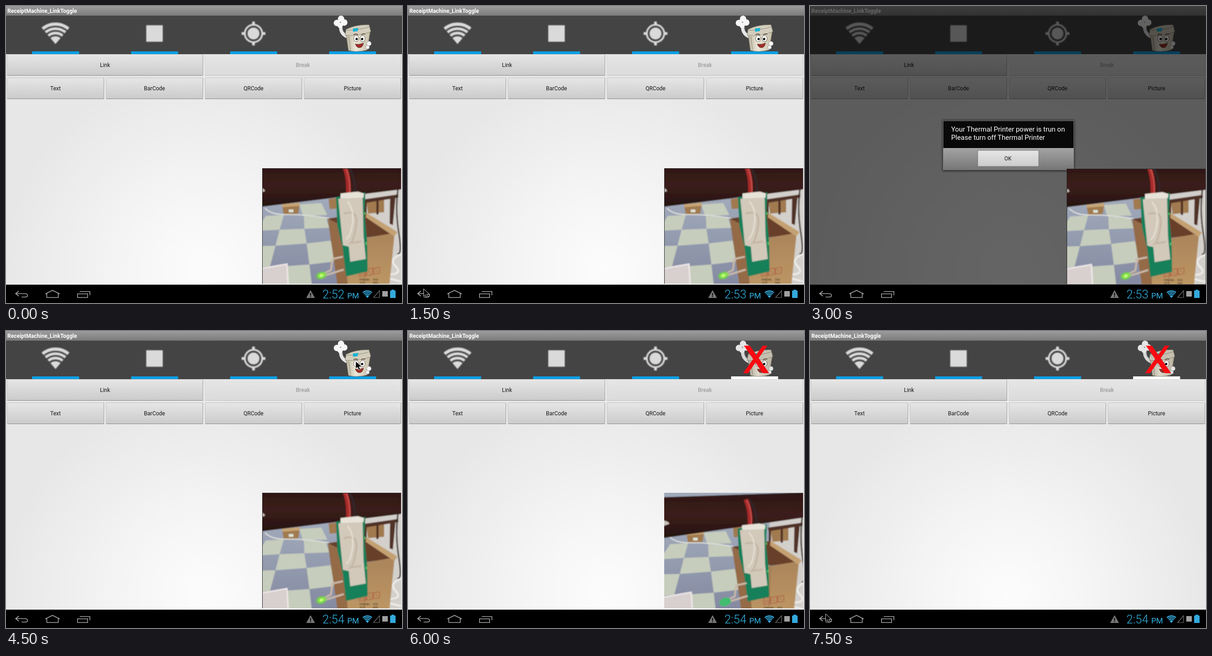
Recreate the animation shown at these times as an HTML page. Size 864x648 px, loop 9000 ms.

```html
<!DOCTYPE html>
<html lang="en">
<head>
<meta charset="utf-8">
<title>Printer switch</title>
<style>
  html, body { margin: 0; width: 100%; height: 100%; overflow: hidden; background: #000; }
  svg { display: block; width: 100vw; height: 100vh; font-family: Roboto, sans-serif; }
  .button { font-size: 12px; text-anchor: middle; fill: #161616; }
  .tiny { font-size: 5.5px; font-weight: bold; fill: #4b3823; }
  .line { fill: none; }
</style>
</head>
<body>
<svg viewBox="0 0 864 648">
  <defs>
    <linearGradient id="titleFill" x2="0" y2="1"><stop stop-color="#9c9c9c"/><stop offset="1" stop-color="#7b7b7b"/></linearGradient>
    <linearGradient id="buttonFill" x2="0" y2="1"><stop stop-color="#e6e6e6"/><stop offset="1" stop-color="#cbcbcb"/></linearGradient>
    <linearGradient id="footFill" x2="0" y2="1"><stop stop-color="#a3a3a3"/><stop offset="1" stop-color="#777"/></linearGradient>
    <linearGradient id="beamFill" x2="0" y2="1"><stop stop-color="#2d1614"/><stop offset=".5" stop-color="#3c1f1b"/><stop offset="1" stop-color="#24110f"/></linearGradient>
    <linearGradient id="floorFill" x2="0" y2="1"><stop offset=".3" stop-color="#a0a9ba"/><stop offset="1" stop-color="#8389a0"/></linearGradient>
    <linearGradient id="boxFill" x2="0" y2="1"><stop stop-color="#a9835a"/><stop offset="1" stop-color="#bd9765"/></linearGradient>
    <linearGradient id="bodyFill"><stop stop-color="#b9b3a1"/><stop offset=".4" stop-color="#eee8d8"/><stop offset="1" stop-color="#c5bda9"/></linearGradient>
    <radialGradient id="pageFill" gradientUnits="userSpaceOnUse" cx="432" cy="575" r="440">
      <stop stop-color="#fcfcfc"/><stop offset=".35" stop-color="#f6f6f6"/><stop offset="1" stop-color="#e7e7e7"/>
    </radialGradient>
    <radialGradient id="glowFill"><stop stop-color="#f4ffc0"/><stop offset=".4" stop-color="#8cf23c"/><stop offset="1" stop-color="#55d62c" stop-opacity=".25"/></radialGradient>
    <filter id="soft"><feGaussianBlur stdDeviation=".8"/></filter>
    <filter id="shade" x="-10%" y="-20%" width="120%" height="140%"><feGaussianBlur stdDeviation="2"/></filter>
    <clipPath id="fanClip"><path d="M0 0L-39 -46V-60H39V-46Z"/></clipPath>
    <clipPath id="photoClip"><rect x="559" y="354" width="303" height="252"/></clipPath>
    <g id="fan" clip-path="url(#fanClip)" stroke="currentColor" fill="none">
      <circle r="43.5" stroke-width="7"/><circle r="33.5" stroke-width="6"/><circle r="24" stroke-width="6"/>
      <circle r="17" fill="currentColor" stroke="none"/>
    </g>
  </defs>

  <rect width="864" height="648"/>
  <rect y="21" width="864" height="587" fill="url(#pageFill)"/>
  <rect width="864" height="21" fill="url(#titleFill)"/>
  <text x="3" y="15" font-size="12" font-weight="bold" fill="#fff">ReceiptMachine_LinkToggle</text>
  <rect y="21" width="864" height="84" fill="#444"/>
  <g id="tabs" fill="#0c9fe3"></g>

  <g filter="url(#soft)" fill="#dadada" color="#dadada">
    <use href="#fan" x="108" y="83"/>
    <rect x="306" y="42" width="36" height="36"/>
    <circle cx="540" cy="60" r="13"/>
    <circle cx="540" cy="60" r="19" class="line" stroke="#dadada" stroke-width="4"/>
    <path d="M537 34h6v7h-6zM537 79h6v7h-6zM514 57h7v6h-7zM559 57h7v6h-7z"/>
  </g>

  <g id="mascot">
    <path class="line" stroke="#e8e8e8" stroke-width="7" d="M730 43Q729 60 744 67"/>
    <path class="line" stroke="#aaa" d="M734 46Q733 57 744 62"/>
    <g fill="#f7f7f7">
      <circle cx="722" cy="37" r="7"/><circle cx="731" cy="28" r="7"/><circle cx="738" cy="36" r="7"/><circle cx="729" cy="42" r="6"/>
    </g>
    <path fill="url(#bodyFill)" stroke="#77715f" stroke-width=".8" d="M742 62L747 97Q766 102 788 96L795 54Z"/>
    <path fill="#d3cdbd" stroke="#847e6b" stroke-width=".8" d="M740 64L742 51Q764 40 792 41L796 56Q768 67 740 64Z"/>
    <path class="line" stroke="#918b79" d="M743 53Q770 53 794 45M748 67L752 96"/>
    <path fill="#17b2d3" d="M757 49L769 48L767 55L757 56Z"/>
    <g fill="#fff" stroke="#453629" stroke-width=".8"><ellipse cx="764" cy="71" rx="5.5" ry="7"/><ellipse cx="778" cy="71" rx="5.5" ry="7"/></g>
    <circle cx="765" cy="72" r="2.5"/><circle cx="777" cy="72" r="2.5"/>
    <path class="line" stroke="#4a3728" stroke-width="1.3" d="M758 63Q763 59 768 63M775 63Q780 59 784 62"/>
    <path fill="#a12e28" stroke="#45211c" stroke-width=".8" d="M762 83Q771 85 780 81Q778 91 771 91Q765 91 762 83Z"/>
    <g fill="#f5f5f5" stroke="#888" stroke-width=".6"><circle cx="792" cy="82" r="5"/><circle cx="789" cy="90" r="4"/></g>
  </g>
  <path id="cross" fill="#f80b12" d="M733 32H746L788 92H774ZM774 32H784L742 92H731Z"/>
  <g id="buttons"></g>
  <rect id="dim" width="864" height="608" opacity=".6"/>

  <g id="dialog">
    <rect x="289" y="249" width="288" height="111" opacity=".6" filter="url(#shade)"/>
    <rect x="290.5" y="250.5" width="285" height="107" fill="#090909" stroke="#777"/>
    <rect x="291" y="310" width="284" height="47" fill="url(#footFill)"/>
    <path stroke="#b5b5b5" d="M291 310.5H575"/>
    <g font-size="15" fill="#fff"><text x="308" y="274">Your Thermal Printer power is trun on</text><text x="308" y="292">Please turn off Thermal Printer</text></g>
    <rect x="366" y="315" width="133" height="35" fill="url(#buttonFill)" stroke="#777"/>
    <text class="button" x="432" y="337">OK</text>
  </g>

  <g id="photo"><g clip-path="url(#photoClip)">
    <g filter="url(#soft)">
      <rect x="550" y="345" width="322" height="270" fill="url(#floorFill)"/>
      <g id="room">
        <path fill="#c7cdbd" d="M640 433L688 430L701 456L648 458ZM567 458L606 456L597 488L545 491ZM650 458L698 461L705 484L651 486ZM597 488L651 486L656 518L588 523ZM545 524L588 523L576 568L545 572ZM656 518L708 512L720 557L662 564ZM576 570L662 564L668 615H576Z"/>
        <path fill="#d3d0cc" d="M784 390H875V615H835L844 490L784 452Z"/>
        <path fill="#a17a50" d="M602 433L641 429L638 453L606 455ZM704 421L722 419V442L706 443ZM786 426L825 423V450L790 453Z"/>
        <path fill="#c6a576" d="M602 433L641 429L640 436L603 439Z"/>
        <path fill="#dde3d8" d="M617 444h10v6h-10z"/>
        <path fill="#513128" d="M780 422L856 411V418L782 430ZM838 415H850L844 478L837 475ZM782 427H787V453H782ZM808 424H813V455H808Z"/>
        <path class="line" stroke="#382a28" stroke-width="3" d="M855 400Q849 445 857 495T854 540"/>
        <path class="line" stroke="#e6e5df" stroke-width="2" d="M565 441Q578 456 613 455T705 463"/>
        <path class="line" stroke="#edece8" stroke-width="4" d="M866 540Q833 551 850 568T834 586T866 602"/>
        <path fill="#68402c" d="M702 464L786 451L848 497L786 505L738 482Z"/>
        <path fill="#946b46" d="M702 464L739 482L746 615H724Z"/>
        <path fill="url(#boxFill)" d="M736 482L786 506L848 495L836 615H746Z"/>
        <path fill="#c4a172" d="M786 451L854 493L847 503L785 461Z"/>
        <path class="line" stroke="#8d633f" d="M786 506L782 615"/>
        <path class="line" stroke="#ae4934" d="M771 576l14-2v14l-14 2zM787 574l13-2v14l-13 2zM802 572l13-2v13l-13 2zM775 587v-7M780 586v-7M791 577l5 7M806 575l5 5"/>
        <text class="tiny" x="771" y="599">ITEM NO.</text><text class="tiny" x="801" y="599">PCS</text>
        <text class="tiny" x="772" y="606">Q'TY</text><text class="tiny" x="801" y="606">KGS</text>
        <path fill="#d8cfcf" stroke="#f0eaea" stroke-width="3" d="M545 575L613 563L616 615H545Z"/>
      </g>
      <path id="beam" fill="url(#beamFill)"/>
      <path id="glint" fill="#c9c0ba" d="M550 396Q565 398 565 404L550 409Z"/>
      <g id="board">
        <path class="line" stroke="#33282a" stroke-width="4" d="M747 350Q762 372 762 409"/>
        <path class="line" stroke="#a82b2b" stroke-width="10" d="M738 348Q749 374 747 409"/>
        <path class="line" stroke="#cc5a55" stroke-width="2" d="M740 350Q752 375 750 409"/>
        <path fill="#14805a" d="M720 417L784 407L782 452L788 515L789 579L742 590L735 530L723 480Z"/>
        <path fill="#d2c9bb" d="M725 421L778 412L780 500L785 552L751 558L748 525L735 522Z"/>
        <path fill="#e8e3d9" d="M730 409L768 405L781 409L780 418L730 420Z"/>
        <path class="line" stroke="#bdad99" stroke-width="4" opacity=".65" d="M737 453Q769 443 764 477T752 517L775 514"/>
        <path class="line" stroke="#e6dfd3" stroke-width="3" d="M745 426Q760 445 756 474T742 509"/>
        <path class="line" stroke="#5dd96d" stroke-width="2" d="M783 450v5M786 515v6"/>
      </g>
      <g id="led">
        <path class="line" stroke="#c9b8a9" stroke-width="4" d="M735 547L712 552L709 576L691 585M737 575L695 588"/>
        <ellipse id="lamp" cx="688" cy="588" rx="13" ry="9" transform="rotate(-18 688 588)"/>
      </g>
    </g>
    <path id="photoEdge" class="line" stroke="#252525" d="M559.5 606V354.5H862"/>
  </g></g>

  <g class="line" stroke="#a4a4a4" stroke-width="1.6">
    <path d="M28 622L21 627.5L28 633M21 627.5H42Q47 628 47 631.5Q47 635 42 635H34"/>
    <path d="M86 628L101.5 620.5L117 628H114V636H89V628Z"/>
    <path d="M156 628H178V636H156ZM161 623H183V631"/>
  </g>
  <path fill="#777" d="M664.5 620L674 637H655Z"/>
  <path d="M663.5 626h2v6h-2zM663.5 633h2v2h-2z"/>
  <g fill="#33b5e5"><text id="clock" x="690.5" y="638" font-size="25.5" font-weight="300"></text><text x="744.5" y="638" font-size="17">PM</text></g>
  <use href="#fan" color="#33a9dc" transform="translate(788.5 637) scale(.35)"/>
  <path class="line" stroke="#777" stroke-width="1.2" d="M802 636H815V621Z"/>
  <rect x="821" y="622" width="12" height="12" fill="#a0a0a0"/>
  <path fill="#33a9dc" d="M838 621H841V619H847V621H850V637H838Z"/>
  <path id="cursor" stroke="#ddd" d="M0 0V16L4 13L7 19L10 17L7 12H13Z"/>
</svg>

<script>
const $ = id => document.getElementById(id);
const show = (id, visible) => $(id).style.display = visible ? "" : "none";
const move = (id, transform) => $(id).setAttribute("transform", transform);

$("tabs").innerHTML = [57, 273, 489, 705].map(x =>
  `<rect x="${x}" y="99" width="102.5" height="6"/>`).join("");

function button(label, x, y, width, disabled) {
  const right = x + width, bottom = y + 46;
  return `<g opacity="${disabled ? .42 : 1}">
    <rect x="${x}" y="${y}" width="${width}" height="46" rx="1" fill="url(#buttonFill)" stroke="#c4c4c4"/>
    <path class="line" stroke="#a2a2a2" d="M${right} ${bottom}V${y}"/>
    <path class="line" stroke="#858585" d="M${x} ${bottom}H${right}"/>
    <text class="button" x="${x + width / 2}" y="${y + 27.5}">${label}</text></g>`;
}
$("buttons").innerHTML = button("Link", 2.5, 105.5, 427) + button("Break", 434.5, 105.5, 427, true) +
  ["Text", "BarCode", "QRCode", "Picture"].map((label, i) => button(label, 2.5 + 216 * i, 156.5, 211)).join("");

const STEP = 1500;
const scenes = [
  { clock: "2:52", photo: [0, 0] },
  { clock: "2:53", photo: [0, 0], cursor: [34, 617] },
  { clock: "2:53", photo: [1, 1], dialog: true },
  { clock: "2:54", photo: [0, -1], cursor: [763, 66] },
  { clock: "2:54", photo: [0, -1], off: true },
  { clock: "2:54", cursor: [34, 617], off: true }
];

function draw({ clock, photo, cursor, dialog, off }) {
  $("clock").textContent = clock;
  show("dim", dialog);
  show("dialog", dialog);
  show("cross", off);
  show("photo", photo);
  show("cursor", cursor);
  show("photoEdge", !off);
  $("tabs").lastChild.setAttribute("fill", off ? "#fff" : "#0c9fe3");
  $("mascot").setAttribute("opacity", off ? .9 : 1);
  if (cursor) move("cursor", `translate(${cursor})`);
  if (!photo) return;
  move("photo", `translate(${photo})`);
  move("room", off ? "translate(5 8)" : "");
  move("board", off ? "translate(-1 48.4) scale(1 .92)" : "");
  move("led", off ? "translate(4 4)" : "");
  move("glint", off ? "translate(5 18)" : "");
  $("beam").setAttribute("d", off ? "M550 364L870 353V407L550 454Z" : "M550 345H870V399L550 439Z");
  $("lamp").setAttribute("fill", off ? "#42bd70" : "url(#glowFill)");
}

let current = -1;
function tick() {
  const index = Math.floor(performance.now() / STEP) % scenes.length;
  if (index !== current) draw(scenes[current = index]);
  requestAnimationFrame(tick);
}
tick();
</script>
</body>
</html>
```
